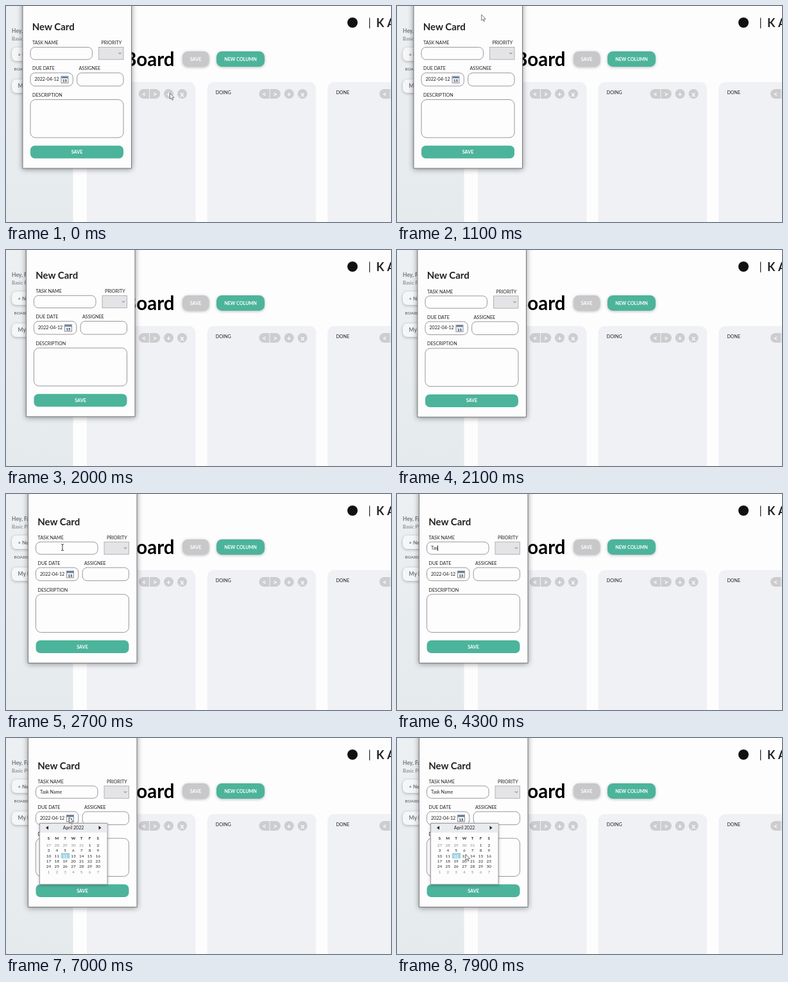
Animation, 600 px wide and 338 px high, one loop 8000 ms. Source, as an HTML page:

```html
<!DOCTYPE html>
<html lang="en">
<head>
<meta charset="utf-8">
<title>New card dialog</title>
<style>
html, body { margin: 0; width: 100%; height: 100%; overflow: hidden; background: #fefdfe; }
svg { display: block; width: 600px; height: 338px; font: 7.2px Lato, sans-serif; fill: #222; }
.b { font-weight: 700; }
.mid { text-anchor: middle; }
.soft { filter: drop-shadow(0 1px 2px rgba(0, 0, 0, .28)); }
.side { fill: #74787b; }
.field { fill: #fefdfe; stroke: #8c8c90; stroke-width: .9; }
.white { fill: #fff; }
.dim { fill: #8a8a8e; }
</style>
</head>
<body>
<svg id="stage" viewBox="0 0 600 338" xmlns="http://www.w3.org/2000/svg"></svg>
<script>
const GREEN = '#4cb49b', GREY = '#cdcdcf';
const LOOP = 8000, STEP = 100;

const rect = (x, y, w, h, r, attrs) =>
  `<rect x="${x}" y="${y}" width="${w}" height="${h}" rx="${r}" ${attrs}/>`;
const text = (x, y, str, cls = '', size = 7.2) =>
  `<text x="${x}" y="${y}" class="${cls}" font-size="${size}">${str}</text>`;
const field = (x, y, w, h, r = 7) => rect(x, y, w, h, r, 'class="field"');

function sidebar() {
  const button = y => rect(9, y, 88, 21, 7, 'fill="#f4f6f7" class="soft"');
  return rect(0, 0, 104.5, 338, 0, 'fill="url(#side)"')
    + text(9, 42.3, 'Hey, Fay', 'side b', 8.5)
    + text(9, 54, 'Basic Plan', 'side', 7.7)
    + button(65) + text(18.5, 78.5, '+ New Board', 'side b', 8)
    + text(12.5, 101, 'BOARDS', 'side b', 6.3)
    + button(115) + text(18.5, 128.3, 'My Board', 'side b', 8.5);
}

function header() {
  return '<circle cx="540" cy="26" r="8" fill="#111"/>'
    + text(564.5, 31.5, '|', '', 17)
    + text(577, 32.5, 'K', 'b', 18) + text(594, 32.5, 'A', 'b', 18)
    + `<g text-anchor="end" fill="#000">${text(262.5, 94.3, 'My Board', 'b', 29.5)}</g>`
    + rect(275, 71, 41.5, 24, 8.5, 'fill="#c8c8ca" class="soft"')
    + text(295.5, 85.5, 'SAVE', 'b mid white')
    + rect(328, 71, 75, 24, 8.5, `fill="${GREEN}" class="soft"`)
    + text(365.5, 85.5, 'NEW COLUMN', 'b mid white');
}

function column(title, i) {
  const round = (x, sign) => `<circle cx="${x}" cy="137.5" r="7.5" fill="${GREY}"/>`
    + text(x, 141.6, sign, 'b mid white', 12);
  return `<g transform="translate(${126 + i * 187.6} 0)">`
    + rect(0, 119, 169.5, 240, 10, 'fill="#eff1f4"')
    + text(13.2, 138, title)
    + rect(80.8, 130, 33.5, 15, 7.5, `fill="${GREY}"`)
    + '<path d="M97.5 130v15" stroke="#f4f4f6"/>'
    + text(89, 141.5, '&lt;', 'b mid white', 11.5) + text(106, 141.5, '&gt;', 'b mid white', 11.5)
    + round(127.5, '+') + round(148.5, 'x') + '</g>';
}

function calendar() {
  const colX = c => 66.5 + c * 12.8;
  let out = rect(52.5, 133.5, 105.5, 95.5, 0, 'fill="#fefdfe" stroke="#9a9a9e" class="soft"')
    + rect(53, 134, 104.5, 14, 0, 'fill="#e9ebef"')
    + text(105, 143.2, 'April 2022', 'mid', 7)
    + '<path d="M66 137.5v6l-4-3zM144.500 137.5v6l4-3z"/>'
    + rect(85.8, 180, 13.4, 8.4, 0, 'fill="#9fd3e3"');
  [...'SMTWTFS'].forEach((d, c) => out += text(colX(c), 158.6, d, 'b mid', 6.2));
  for (let i = 0; i < 42; i++) {
    const day = new Date(2022, 2, 27 + i);
    const chosen = day.getMonth() === 3 && day.getDate() === 12;
    const cls = chosen ? 'white b' : day.getMonth() === 3 ? '' : 'dim';
    out += text(colX(i % 7), 169.7 + Math.floor(i / 7) * 8.4, day.getDate(), 'mid ' + cls, 6.4);
  }
  return out;
}

function dialog() {
  return rect(34.5, -40, 169.5, 304.5, 0,
      'fill="#fefdfe" stroke="#77797c" style="filter:drop-shadow(0 1px 4px rgba(0,0,0,.42))"')
    + text(49.2, 48.5, 'New Card', 'b', 15)
    + text(49.5, 70.8, 'TASK NAME') + field(46.5, 75, 96.5, 19.3)
    + text(157, 70.8, 'PRIORITY')
    + rect(153, 75, 38.5, 19.3, 0, 'fill="#e4e4e7" stroke="#a2a2a6" stroke-width=".8"')
    + '<path d="M184 83.5l2 2 2-2" fill="none" stroke="#444" stroke-width=".8"/>'
    + text(49.5, 110.7, 'DUE DATE') + field(46.5, 115.2, 66.3, 20.5)
    + text(53, 127.6, '2022-04-12', '', 7.1)
    + rect(94.5, 120.5, 11, 10.5, 0, 'fill="#f3f5f8" stroke="#7e8793" stroke-width=".9"')
    + rect(95, 121, 10, 2.6, 0, 'fill="#5f7f9f"')
    + text(100, 129.9, '15', 'b mid', 6)
    + text(122, 110.7, 'ASSIGNEE') + field(119.2, 115.2, 72.3, 20.5)
    + text(49.5, 152.5, 'DESCRIPTION') + field(46.5, 157, 145, 59.5, 8)
    + rect(46.500, 229, 145, 20, 7, `fill="${GREEN}"`)
    + text(119, 241.5, 'SAVE', 'b mid white')
    + '<text id="typed" x="53" y="87.2" font-size="7.2" style="white-space:pre"></text>'
    + '<path id="caret" d="M0 80.500v8.500" stroke="#111" stroke-width=".9"/>'
    + `<g id="calendar">${calendar()}</g>`;
}

const stage = document.getElementById('stage');
stage.innerHTML = `<defs><linearGradient id="side" x2="0" y2="1">
    <stop stop-color="#edf0f2"/><stop offset="1" stop-color="#e5eaed"/></linearGradient></defs>`
  + sidebar() + header() + ['TO DO', 'DOING', 'DONE'].map(column).join('')
  + `<g id="dialog">${dialog()}</g>`
  + '<path id="arrow" d="M0 0v9.200l2.100-1.900 1.500 3.500 1.500-.7-1.500-3.300h2.900z" fill="#fff" stroke="#555" stroke-width=".8"/>'
  + '<path id="beam" d="M-2-5q2 0 2 1.200q0-1.200 2-1.200M0-4v8M-2 5q2 0 2-1.200q0 1.200 2 1.200" fill="none" stroke="#222" stroke-width=".9"/>';

const el = id => document.getElementById(id);
const show = (node, on) => node.style.display = on ? '' : 'none';
const [dialogEl, typedEl, caretEl, calendarEl, arrowEl, beamEl] =
  ['dialog', 'typed', 'caret', 'calendar', 'arrow', 'beam'].map(el);

// Key points: time, x, y
const dragPath = [[1700, -8.5, -10.5], [1800, -6.3, -8.3], [2000, -3, -3.7], [2400, 0, 0]];
const mousePath = [[300, 255.500, 136.5], [1400, 104, -14], [2400, 108, -14], [2600, 100, 42],
  [2700, 88, 83.5], [3800, 88, 83.5], [6000, 85.500, 77], [6800, 98.5, 124],
  [7000, 98.5, 124], [7700, 99, 178], [7900, 107, 182]];
const phrase = 'Task Name';
const keyTimes = [3800, 4100, 4300, 4500, 4800, 5000, 5200, 5400, 5600];

function along(path, t) {
  const i = path.findIndex(p => p[0] > t);
  if (i === 0) return path[0].slice(1);
  if (i < 0) return path[path.length - 1].slice(1);
  const [t0, x0, y0] = path[i - 1], [t1, x1, y1] = path[i];
  const u = (t - t0) / (t1 - t0), s = u * u * (3 - 2 * u);
  return [x0 + (x1 - x0) * s, y0 + (y1 - y0) * s];
}

function draw() {
  const t = Math.floor(performance.now() % LOOP / STEP) * STEP;
  dialogEl.setAttribute('transform', `translate(${along(dragPath, t)})`);

  const pointer = `translate(${along(mousePath, t)})`;
  const inField = t >= 2700 && t < 3800;
  arrowEl.setAttribute('transform', pointer);
  beamEl.setAttribute('transform', pointer);
  show(beamEl, inField);
  show(arrowEl, t < 2700 || t >= 6000);

  const count = keyTimes.filter(k => k <= t).length;
  typedEl.textContent = phrase.slice(0, count);
  const lastKey = count ? keyTimes[count - 1] : 2900;
  const width = count ? typedEl.getComputedTextLength() : 0;
  caretEl.setAttribute('transform', `translate(${53.4 + width} 0)`);
  show(caretEl, t >= 2900 && t < 6000 && (t - lastKey) % 1060 < 530);

  show(calendarEl, t >= 6900);
  requestAnimationFrame(draw);
}
draw();
</script>
</body>
</html>
```
